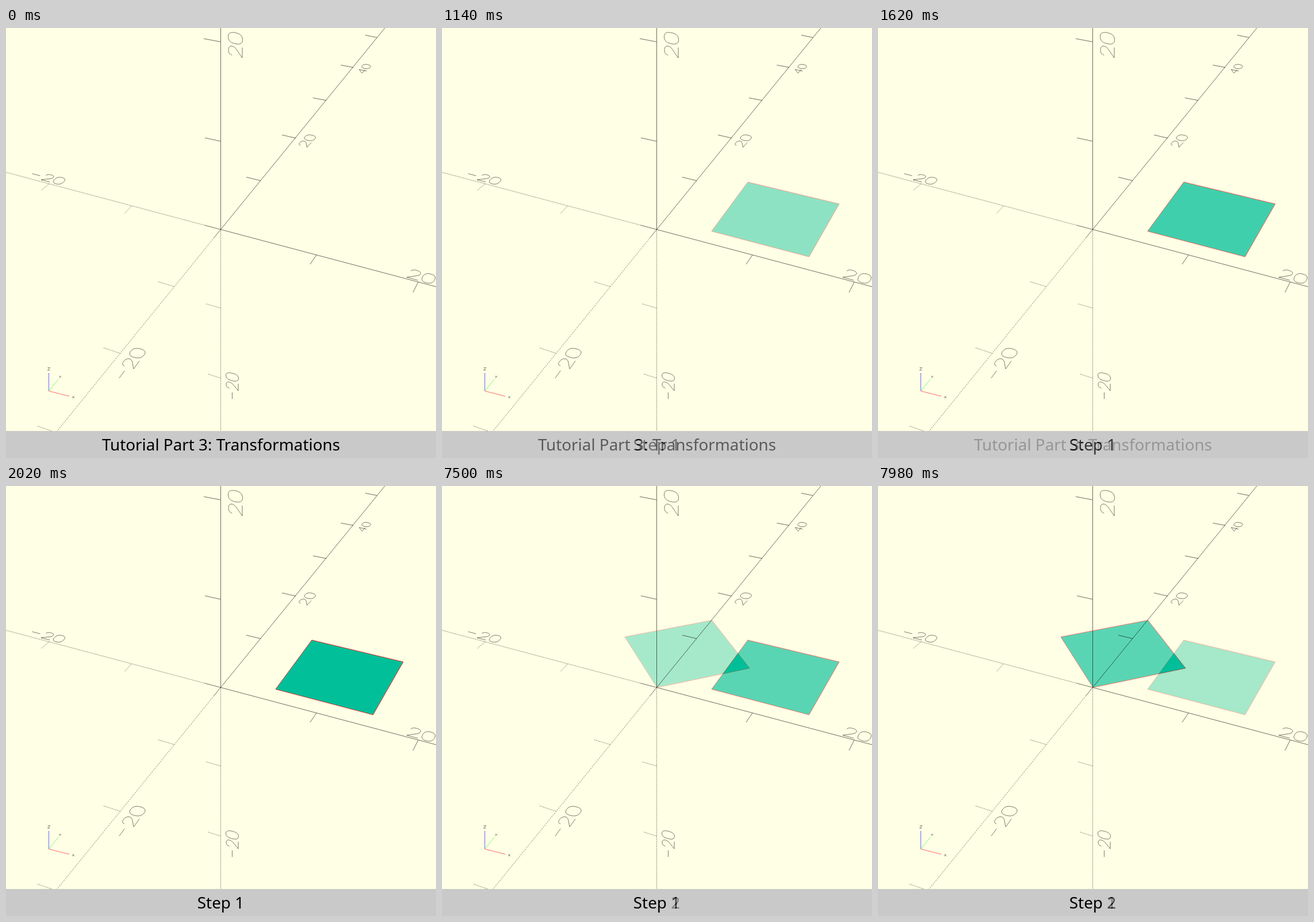
An HTML page that plays this animation: 748 px wide and 748 px high, repeating every 8000 ms.

```html
<!DOCTYPE html>
<html lang="en">
<head>
<meta charset="utf-8">
<title>Transformations</title>
<style>
  html, body { margin: 0; width: 100%; height: 100%; overflow: hidden; background: #ffffe5; }
  svg { display: block; width: 100vw; height: 100vh; }
  path { fill: none; }
  .paper { fill: #ffffe5; }
  .bar { fill: #c9c9c9; }
  .face { fill: #00bf99; }
  .edge { fill: none; stroke: #f00; stroke-width: .9; stroke-opacity: .9; }
  .axes { stroke: #000; stroke-opacity: .72; stroke-width: .8; }
  .dots { stroke-dasharray: 1.5; }
  .steep { stroke-dasharray: 1.93; }
  .labels { stroke: #000; stroke-opacity: .65; stroke-width: .8; }
  .glyph { vector-effect: non-scaling-stroke; }
  .gizmo { stroke-width: .8; }
  .caption { font: 27.85px "Noto Sans", "Open Sans", sans-serif; text-anchor: middle; fill: #000; }

  /* Each layer is a full opaque picture, so its opacity is the cross-fade weight. */
  .layer { opacity: 0; animation: 8s infinite; }
  .one { animation-name: one; }
  .two { animation-name: two; }
  @keyframes one {
    0% { opacity: 0; animation-timing-function: step-end; }
    6.25% { opacity: 0; animation-timing-function: steps(19, jump-both); }
    25.25%, 100% { opacity: 1; }
  }
  @keyframes two {
    0% { opacity: 0; animation-timing-function: step-end; }
    87.75% { opacity: 0; animation-timing-function: steps(12, jump-both); }
    99.75%, 100% { opacity: .65; }
  }
</style>
</head>
<body>
<svg viewBox="0 0 748 748">
  <defs>
    <!-- Stroke digits, one unit high with y up; placed by a matrix of baseline and up vectors -->
    <path id="minus" class="glyph" d="M-1.03 .5H-.33"/>
    <path id="d2" class="glyph" d="M.05 .74C.05 .92 .18 1 .37 1C.57 1 .7 .9 .7 .73C.7 .6 .62 .5 .5 .4L0 0H.75"/>
    <path id="d4" class="glyph" d="M.53 0V1L0 .32H.75"/>
    <path id="d0" class="glyph" d="M.92 .5C.92 .16 1.04 -.02 1.32 -.02S1.72 .16 1.72 .5S1.6 1.02 1.32 1.02S.92 .84 .92 .5Z"/>

    <g id="backdrop">
      <rect class="paper" width="748" height="748"/>
      <rect class="bar" y="701" width="748" height="47"/>
    </g>

    <g id="grid">
      <g class="axes">
        <path d="M373.5 0V350.5M346 343.2L373.5 350.5L748 450M362 364.7L373.5 350.5L659 0"/>
        <path class="dots" d="M373.5 350.5V701M346 343.2L0 251"/>
        <path class="dots steep" d="M362 364.7L89 701"/>
        <path d="M344 18.5L373 24M346 191L373 197
                 M540 395L529 411M717 442L708 460
                 M418 259.5L443 265.5M480 186L504 191.5M534 121.5L557 126
                 M582.5 64.5L604 68.5M625 12.5L645 16.5"/>
        <path class="dots" d="M348.5 480L373 487M351.5 602L373 609
                 M218 310L206 323M75 271L61 283
                 M265 441.5L293 450M170 556.5L199 566M55 692.5L79 701"/>
      </g>
      <g class="labels">
        <g transform="matrix(0 -24 -24 -5 411 52)"><use href="#d2"/><use href="#d0"/></g>
        <g transform="matrix(0 -16.3 -21 -5 404 631)"><use href="#minus"/><use href="#d2"/><use href="#d0"/></g>
        <g transform="matrix(25.8 7.1 8 -14.5 697 433.5)"><use href="#d2"/><use href="#d0"/></g>
        <g transform="matrix(20 5.2 10 -10.5 61 264)"><use href="#minus"/><use href="#d2"/><use href="#d0"/></g>
        <g transform="matrix(10 -11 -16 -4 523.5 207.5)"><use href="#d2"/><use href="#d0"/></g>
        <g transform="matrix(7.3 -8.3 -13 -3 623.5 79.5)"><use href="#d4"/><use href="#d0"/></g>
        <g transform="matrix(13.5 -18.5 -22.5 -6 222 593)"><use href="#minus"/><use href="#d2"/><use href="#d0"/></g>
        <path d="M72.5 590.8h4l-4 4.4h4M92.5 605l1.6 2M96 605l-3 4M115.2 640.5l3.6 3.5M118.8 640.5l-3.6 3.5"/>
      </g>
      <g class="gizmo">
        <path stroke="#44f" d="M74.5 631.5V600"/>
        <path stroke="#5f5" d="M74.5 631.5L91 611"/>
        <path stroke="#f44" d="M74.5 631.5L110 640.5"/>
      </g>
    </g>

    <polygon id="moved" points="469,353.5 532,268 691,306 638.5,398"/>
    <polygon id="turned" points="374,350.5 318,262.5 469.5,233.5 535,317"/>
  </defs>

  <g>
    <use href="#backdrop"/>
    <use href="#grid"/>
    <text class="caption" x="374" y="735">Tutorial Part 3: Transformations</text>
  </g>
  <g class="layer one">
    <use href="#backdrop"/>
    <use class="face" href="#moved"/>
    <use href="#grid"/>
    <use class="edge" href="#moved"/>
    <text class="caption" x="373.5" y="735">Step 1</text>
  </g>
  <g class="layer two">
    <use href="#backdrop"/>
    <use class="face" href="#turned"/>
    <use href="#grid"/>
    <use class="edge" href="#turned"/>
    <text class="caption" x="373.5" y="735">Step 2</text>
  </g>
</svg>
</body>
</html>
```
